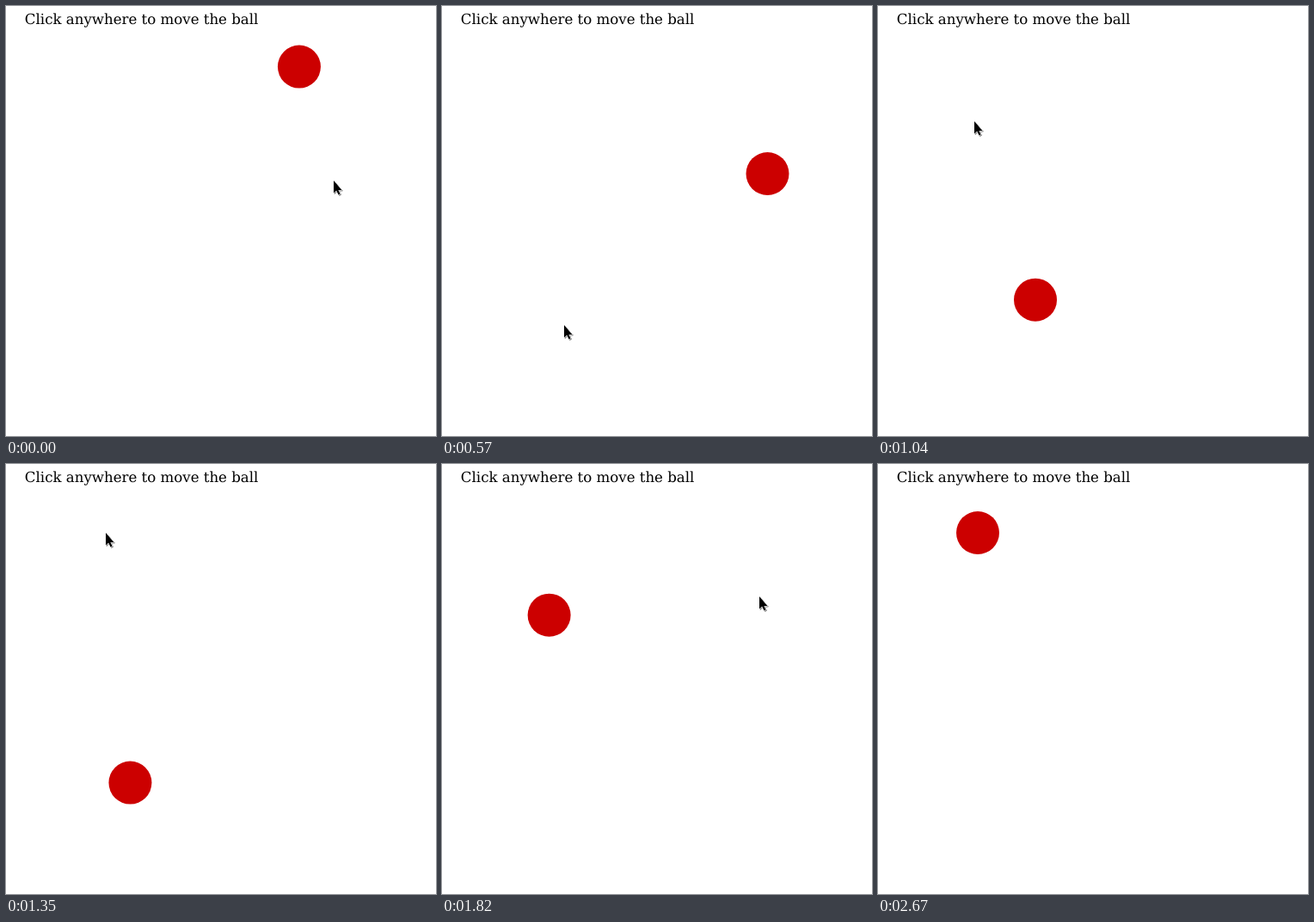
An HTML page for the animation above (2740 ms loop, 500 by 500 pixels).

```html
<!DOCTYPE html>
<html lang="en">
<head>
<meta charset="utf-8">
<title>Move the ball</title>
<style>
  html, body { margin: 0; width: 100%; height: 100%; overflow: hidden; background: #fff; }
  svg { display: block; width: 100vw; height: 100vh; }
  text { font: 16.62px "DejaVu Serif", serif; text-rendering: geometricPrecision; }
  #cursor { filter: drop-shadow(1px 1px .6px rgba(0, 0, 0, .45)); }
</style>
</head>
<body>
<svg viewBox="0 0 500 500">
  <text x="21.8" y="21">Click anywhere to move the ball</text>
  <circle id="ball" r="25" fill="#c00"/>
  <path id="cursor" d="M0 0V14.5L3.2 11.5L5.5 16.5L7.5 15.5L5.4 11H9.4Z"
        stroke="#fff" stroke-width="1" paint-order="stroke"/>
</svg>
<script>
const LOOP = 2740;
const ball = document.getElementById('ball');
const cursor = document.getElementById('cursor');

// Each click sends the ball on from wherever it is
const HOME = { x: 331.4, y: 40 };
const CLICKS = [
  { at: -150, time: 1000, x: 382.3, y: 203 },
  { at: 562, time: 910, x: 142, y: 372.4 },
  { at: 1428, time: 1000, x: 116, y: 80 }
];

// Where the hand rests or turns; it leaves at the right edge
const HAND = [
  { at: 0, x: 382, y: 202 },
  { at: 310, x: 142, y: 372 },
  { at: 570, x: 142, y: 372 },
  { at: 770, x: 125, y: 271 },
  { at: 1040, x: 112, y: 134 },
  { at: 1200, x: 116, y: 80 },
  { at: 1480, x: 116, y: 80 },
  { at: 1650, x: 143, y: 92 },
  { at: 1950, x: 540, y: 200 }
];

const clamp = u => Math.min(1, Math.max(0, u));
const mix = (a, b, u) => ({ x: a.x + (b.x - a.x) * u, y: a.y + (b.y - a.y) * u });

// cubic-bezier(.25, .1, .25, 1), solved by bisection
function ease(u) {
  const curve = (s, p, q) => 3 * (1 - s) * s * ((1 - s) * p + s * q) + s ** 3;
  let lo = 0, hi = 1;
  for (let i = 0; i < 30; i++) {
    const mid = (lo + hi) / 2;
    if (curve(mid, .25, .25) < u) lo = mid; else hi = mid;
  }
  return curve(lo, .1, 1);
}

function ballAt(t) {
  return CLICKS.reduce((from, click, i) => {
    const next = CLICKS[i + 1];
    const until = next ? Math.min(t, next.at) : t;
    return mix(from, click, ease(clamp((until - click.at) / click.time)));
  }, HOME);
}

function handAt(t) {
  const i = HAND.findIndex(p => p.at > t);
  if (i < 0) return HAND[HAND.length - 1];
  const [a, b] = [HAND[i - 1], HAND[i]];
  return mix(a, b, (t - a.at) / (b.at - a.at));
}

function draw(t) {
  const b = ballAt(t), h = handAt(t);
  ball.setAttribute('cx', b.x.toFixed(2));
  ball.setAttribute('cy', b.y.toFixed(2));
  cursor.setAttribute('transform', `translate(${Math.round(h.x)} ${Math.round(h.y)})`);
}

const began = performance.now();
function tick() {
  draw((performance.now() - began) % LOOP);
  requestAnimationFrame(tick);
}
tick();
</script>
</body>
</html>
```
